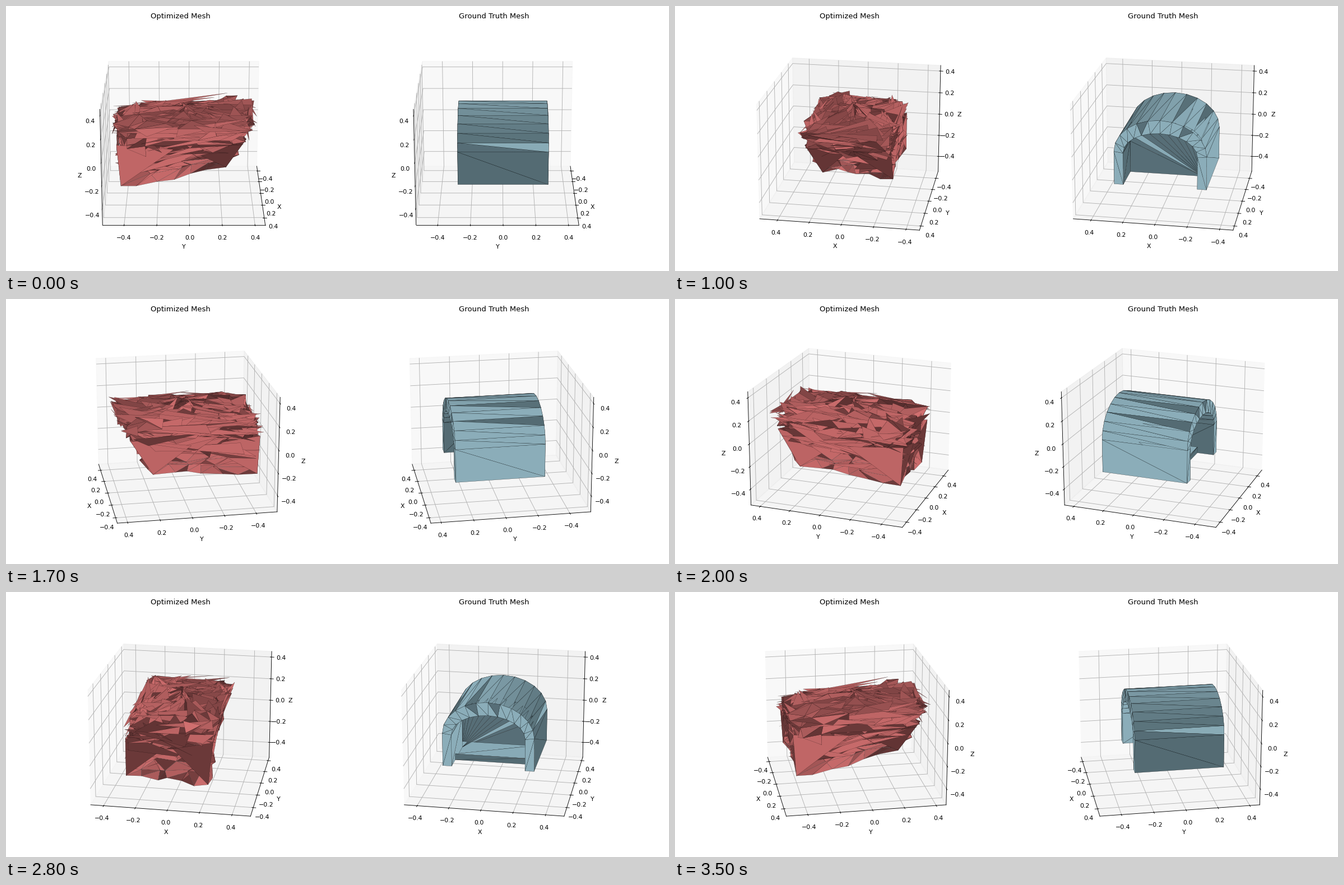
A matplotlib script for the animation above (3.6 s loop, 1183 by 473 pixels).

```python
import matplotlib.pyplot as plt
import numpy as np
from matplotlib.animation import FuncAnimation
from mpl_toolkits.mplot3d.art3d import Poly3DCollection

WIDTH, HEIGHT = 1183, 473
FRAMES, INTERVAL = 36, 100
LIGHT = np.array([-2, -2, 1]) / 3
CORAL = np.array([240, 128, 128]) / 255
STEEL_DARK = np.array([84, 107, 115]) / 255
STEEL_LIGHT = np.array([139, 173, 185]) / 255
FLOOR, SPRING, FRONT, BACK = -0.308, -0.02, 0.281, -0.281
PARTITION, SILL, SILL_TOP = 0.058, -0.17, -0.255

# Corners of the crumpled block, counted around the vertical axis.
FOOT = np.array([(0.235, -0.43, -0.35), (-0.273, -0.45, -0.306),
                 (-0.28, 0.21, -0.25), (0.16, 0.23, -0.22)])
RIM = np.array([(0.28, -0.46, 0.18), (-0.27, -0.47, 0.16),
                (-0.29, 0.41, 0.19), (0.28, 0.40, 0.19)])
AXIS, SUMMIT = np.array([0, -0.03]), np.array([0, -0.03, 0.25])


def steel(dot):
    mix = np.clip((dot + 0.667) / 1.333, 0, 1)
    return STEEL_DARK + mix * (STEEL_LIGHT - STEEL_DARK)


def arch_profile(rx, rz, center):
    """Foot, half ellipse, foot, as (x, z) points."""
    angle = np.linspace(0, np.pi, 13)
    x = np.r_[rx, rx * np.cos(angle), -rx]
    z = np.r_[FLOOR, center + rz * np.sin(angle), FLOOR]
    return np.column_stack([x, z])


def at(point, y):
    return (point[0], y, point[1])


def build_tunnel():
    outer = arch_profile(0.29, 0.292, SPRING)
    inner = arch_profile(0.233, 0.19, -0.03)
    faces, colors = [], []

    def add(dot, *points):
        faces.append(points)
        colors.append(steel(dot))

    def shell(profile, y0, y1, flipped=()):
        for i, (p, q) in enumerate(zip(profile[:-1], profile[1:])):
            dx, dz = q - p
            dot = (-2 * dz - dx) / 3 / np.hypot(dx, dz)
            low, high = [-dot if (i, k) in flipped else dot for k in (0, 1)]
            add(low, at(p, y0), at(q, y0), at(p, y1))
            add(high, at(q, y0), at(q, y1), at(p, y1))

    def ring(y, dark):
        for i in range(len(outer) - 1):
            add(-0.6 if i in dark else 0.667,
                at(outer[i], y), at(outer[i + 1], y), at(inner[i], y))
            add(0.667, at(inner[i], y), at(inner[i + 1], y), at(outer[i + 1], y))

    def quad(dot, a, b, c, d):
        add(dot, a, b, c)
        add(dot, a, c, d)

    shell(outer, BACK, FRONT, flipped={(1, 1), (8, 0), (10, 0)})
    shell(inner, BACK, PARTITION)
    shell(inner, PARTITION, FRONT)
    ring(FRONT, dark={5, 9})
    ring(BACK, dark={6, 8})

    for i in range(len(inner) - 2):
        add(0.6 if i == 2 else -0.6, at(inner[-1], PARTITION),
            at(inner[i], PARTITION), at(inner[i + 1], PARTITION))

    left, right = -0.233, 0.233
    quad(0.6, (left, SILL, SILL_TOP), (right, SILL, SILL_TOP),
         (right, PARTITION, SILL_TOP), (left, PARTITION, SILL_TOP))
    quad(-0.667, (left, SILL, FLOOR), (right, SILL, FLOOR),
         (right, SILL, SILL_TOP), (left, SILL, SILL_TOP))
    return np.array(faces), colors


def block_point(side, t, scale=1.0):
    """Side runs 0 to 4 around the block, t from the foot over the rim to the summit."""
    i, part = int(side // 1) % 4, side % 1
    foot, rim = [(1 - part) * ring[i] + part * ring[(i + 1) % 4] for ring in (FOOT, RIM)]
    if t < 0.7:
        point = foot + (rim - foot) * t / 0.7
    else:
        point = rim + (SUMMIT - rim) * (t - 0.7) / 0.3
    point[:2] = AXIS + (point[:2] - AXIS) * scale
    return point


def build_block():
    rng = np.random.default_rng(11)
    cols, rows = 24, 10
    grid = np.array([[block_point(4 * c / cols + rng.normal(0, 0.09) * (r > 0),
                                  r / (rows - 1), rng.normal(0.93, 0.055))
                      + rng.normal(0, (0.01, 0.015, 0.022))
                      for c in range(cols)] for r in range(rows)])
    grid[0, ::cols // 4] = FOOT
    faces = []
    for r in range(rows - 1):
        for c in range(cols):
            d = (c + 1) % cols
            faces.append((grid[r, c], grid[r, d], grid[r + 1, c]))
            faces.append((grid[r, d], grid[r + 1, d], grid[r + 1, c]))

    # Long thin shards lying along the sides and the rim.
    for _ in range(230):
        side, t = rng.uniform(0, 4), rng.triangular(0.05, 0.65, 0.9)
        reach = rng.uniform(0.25, 0.85) * rng.choice([-1, 1])
        tip = block_point(side + reach, np.clip(t + rng.normal(0, 0.08), 0, 0.9),
                          rng.uniform(0.95, 1.06))
        base = [block_point(side + rng.normal(0, 0.1), min(t + step, 0.95),
                            rng.normal(0.97, 0.04))
                for step in (0, rng.uniform(0.05, 0.2))]
        faces.append((*base, tip + (0, 0, rng.normal(0.01, 0.02))))

    # Broad flat facets low on each side.
    for i in range(4):
        for turn in (-0.45, 0.45):
            faces.append((FOOT[i], block_point(i, 0.5), block_point(i + turn, 0.4)))

    faces = np.array(faces)
    normals = np.cross(faces[:, 1] - faces[:, 0], faces[:, 2] - faces[:, 0])
    normals /= np.linalg.norm(normals, axis=1, keepdims=True) + 1e-12
    lit_chance = np.where(abs(normals[:, 0]) > abs(normals[:, 1]), 0.7, 0.5)
    sign = np.where(rng.random(len(faces)) < lit_chance, 1, -1)
    dots = abs(normals @ LIGHT) * sign
    return faces, CORAL * (0.61 + 0.26 * dots)[:, None]


fig = plt.figure(figsize=(15, 6), dpi=WIDTH / 15, facecolor="white")
SIDE, BOTTOM = 432.9, 11.8


def add_view(center, title, mesh, line_width):
    ax = fig.add_axes([(center - SIDE / 2) / WIDTH, BOTTOM / HEIGHT,
                       SIDE / WIDTH, SIDE / HEIGHT], projection="3d")
    faces, colors = mesh
    ax.add_collection3d(Poly3DCollection(
        faces, facecolors=colors, edgecolors=(0, 0, 0, 0.75), linewidths=line_width))
    half = 0.4975
    ax.set(title=title, xlabel="X", ylabel="Y", zlabel="Z",
           xlim=(0.0156 - half, 0.0156 + half),
           ylim=(-0.0345 - half, -0.0345 + half),
           zlim=(-0.0457 - half, -0.0457 + half))
    return ax


views = [add_view(311.6, "Optimized Mesh", build_block(), 0.2),
         add_view(871.1, "Ground Truth Mesh", build_tunnel(), 0.3)]


def update(frame):
    for ax in views:
        ax.view_init(elev=20, azim=frame * 360 / FRAMES)
    return []


animation = FuncAnimation(fig, update, frames=FRAMES, interval=INTERVAL, repeat=True)
plt.show()
```
